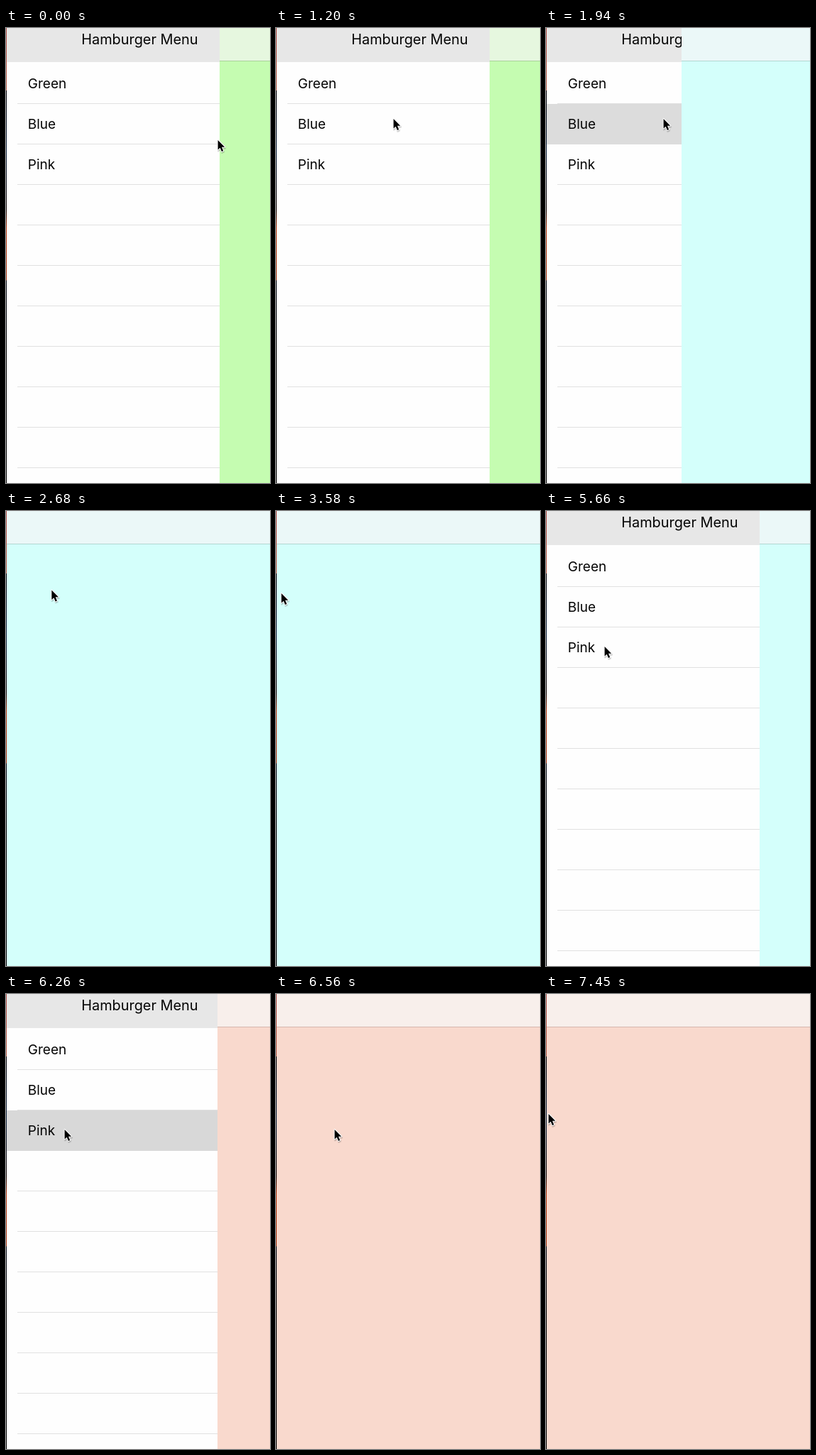
An HTML page for the animation above (8 s loop, 372 by 641 pixels).

```html
<!DOCTYPE html>
<html lang="en">
<head>
<meta charset="utf-8">
<title>Hamburger Menu</title>
<style>
  html, body { margin: 0; width: 100%; height: 100%; overflow: hidden; background: #fefefe; }
  svg { display: block; width: 372px; height: 641px; }
  text { font-family: Inter, Roboto, sans-serif; fill: #050505; }
</style>
</head>
<body>
<svg viewBox="0 0 372 641" xmlns="http://www.w3.org/2000/svg">
  <defs>
    <linearGradient id="desk" x1="0" y1="0" x2="0" y2="1">
      <stop offset="0" stop-color="#b0524c"/>
      <stop offset=".137" stop-color="#b8604c"/>
      <stop offset=".138" stop-color="#0c0a10"/>
      <stop offset=".27" stop-color="#182c48"/>
      <stop offset=".4" stop-color="#1c1010"/>
      <stop offset=".44" stop-color="#b83c14"/>
      <stop offset=".553" stop-color="#a83814"/>
      <stop offset=".556" stop-color="#101420"/>
      <stop offset=".7" stop-color="#050507"/>
    </linearGradient>
  </defs>
  <rect width="372" height="641" fill="#fefefe"/>
  <rect x="1" width="300" height="48" fill="#e7e7e7"/>
  <text x="106.2" y="22.5" font-size="19.9">Hamburger Menu</text>
  <g id="lines" fill="#e1e1e1"></g>
  <rect id="mark" x="1" width="300" height="57"/>
  <g id="labels" font-size="19"></g>
  <g id="page">
    <rect id="body" width="372" height="641"/>
    <rect id="bar" width="372" height="46"/>
    <rect id="rule" y="46" width="372" height="1"/>
  </g>
  <rect width="1" height="641" fill="url(#desk)"/>
  <g id="cursor">
    <path id="shade" transform="translate(.6 1.6)" fill="#000" fill-opacity=".22" stroke="#000" stroke-opacity=".14" stroke-width="2.6" stroke-linejoin="round"/>
    <path id="arrow" fill="#000" stroke="#fff" stroke-width="2" stroke-linejoin="round" paint-order="stroke"/>
  </g>
</svg>
<script>
const LOOP = 8000, TICK = 149, ROW = 57;
const $ = id => document.getElementById(id);
const set = (el, attrs) => {
  for (const k in attrs) el.setAttribute(k, attrs[k]);
  return el;
};
const add = (parent, tag, attrs, text = '') => {
  const el = document.createElementNS('http://www.w3.org/2000/svg', tag);
  el.textContent = text;
  $(parent).appendChild(set(el, attrs));
};

for (let y = 106; y < 641; y += ROW) add('lines', 'rect', { x: 16, y, width: 285, height: 1 });
['Green', 'Blue', 'Pink'].forEach((name, i) =>
  add('labels', 'text', { x: 30.8, y: 85.3 + i * ROW }, name));
for (const id of ['arrow', 'shade'])
  set($(id), { d: 'M0 0V13.6L3.1 10.7L5.3 16L7.6 15L5.4 9.8H9.6Z' });

const easeOut = p => p * (2 - p);
const easeInOut = p => p * p * (3 - 2 * p);

// All times below are in ticks: the picture is refreshed once per tick.
const themes = [
  { at: 0, body: '#c5fcb1', bar: '#e6f7df', rule: '#a9d19a' },
  { at: 13, body: '#d4fffb', bar: '#ebf8f8', rule: '#b2d6d2', row: 1, tint: '#dcdcdc' },
  { at: 42, body: '#f9d9cd', bar: '#f8efeb', rule: '#d6b7ae', row: 2, tint: '#d8d8d8' }
];

const glide = (at, span, x, y) => ({ at, span, to: [x, y], ease: easeOut });
const cursor = [
  glide(1, 3, 180, 103),
  glide(5, 3, 166, 128),
  glide(17, 2, 31, 106),
  glide(20, 1, 1, 116),
  glide(22, 2, 8, 116),
  glide(27, 2, 140, 117),
  glide(33, 5, 83, 191),
  glide(45, 5, 4, 169)
];

// The page closes over the menu, is dragged open, released, and closes again.
const slide = (at, span, x, ease = easeInOut) => ({ at, span, to: [x], ease });
const page = [
  slide(12.14, 2.1, 1),
  slide(27, 2, 124, easeOut),
  slide(29, 2, 301),
  slide(41.87, 2.1, 1)
];

const follow = (start, moves, k) => moves.reduce((pos, m) => {
  const p = m.ease(Math.min(1, Math.max(0, (k - m.at) / m.span)));
  return pos.map((v, i) => v + (m.to[i] - v) * p);
}, start);

function draw(t) {
  const k = Math.floor((t + 6) / TICK);
  const theme = themes.filter(s => k >= s.at).pop();
  const [edge] = follow([301], page, k);
  const [x, y] = follow([299, 158], cursor, k);
  const lit = theme.row && k < theme.at + 3;
  for (const id of ['body', 'bar', 'rule']) set($(id), { fill: theme[id] });
  set($('page'), { transform: `translate(${Math.round(edge)} 0)` });
  set($('mark'), { y: 50 + (theme.row || 0) * ROW, fill: lit ? theme.tint : 'none' });
  set($('cursor'), { transform: `translate(${x - 0.4} ${y})` });
}

const began = performance.now();
function tick() {
  draw((performance.now() - began) % LOOP);
  requestAnimationFrame(tick);
}
tick();
</script>
</body>
</html>
```
